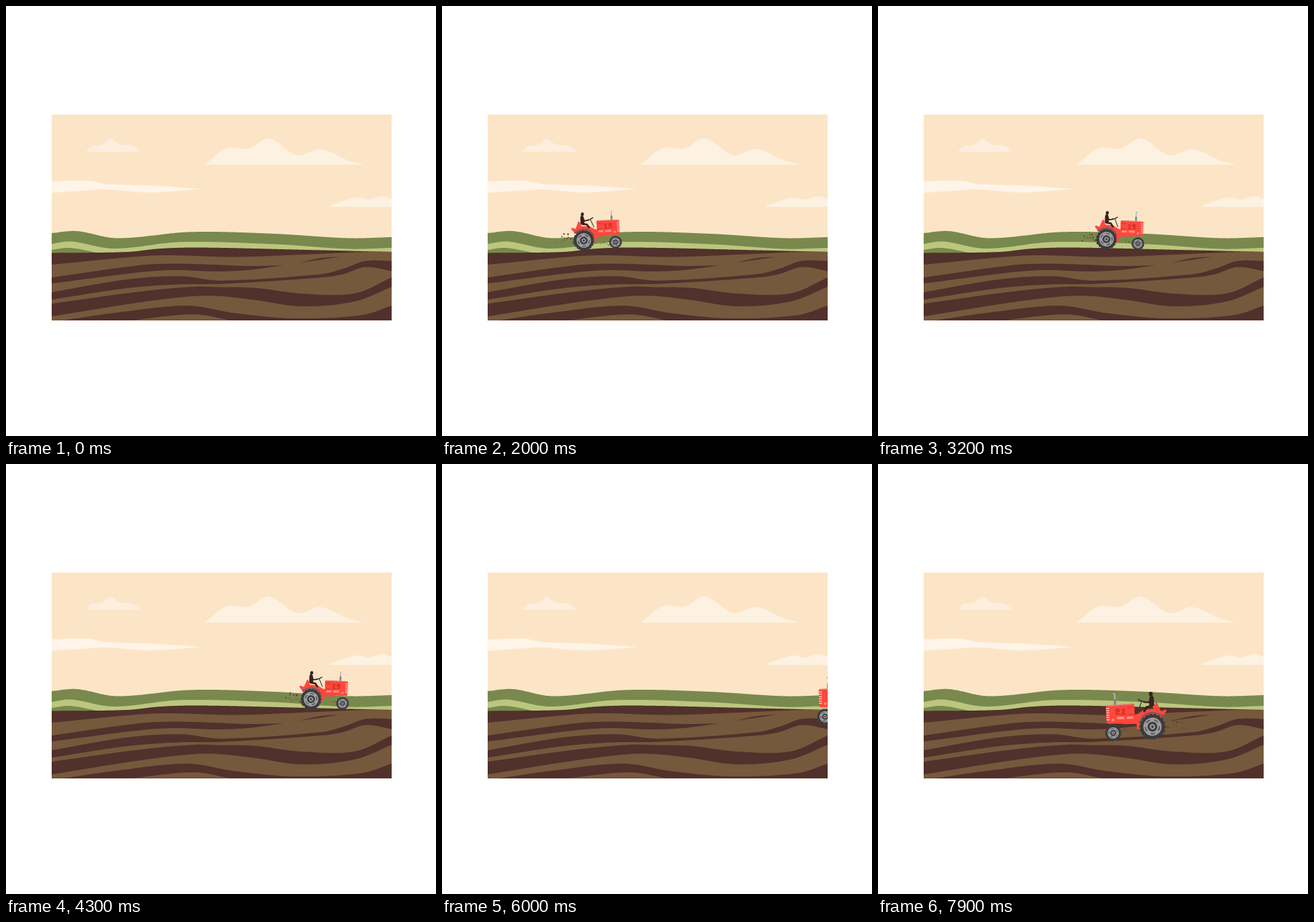
Recreate the animation shown at these times as an HTML page with a canvas. Size 640 by 640 pixels, loop 8 s.

```html
<!DOCTYPE html>
<html lang="en">
<head>
<meta charset="utf-8">
<title>Tractor in the field</title>
<style>
html, body { margin: 0; width: 100%; height: 100%; overflow: hidden; background: #fff; }
canvas { display: block; width: 640px; height: 640px; }
</style>
</head>
<body>
<canvas id="stage"></canvas>
<script>
const canvas = document.getElementById('stage');
const ctx = canvas.getContext('2d');
const ratio = window.devicePixelRatio || 1;
canvas.width = canvas.height = 640 * ratio;

const LOOP = 8000, STEP = 100, FLOOR = 468;
const SKY = '#fce5c6', CLOUD = '#fdf1e2', HAZE = '#fef4e8', GREEN = '#79894d', LIME = '#bbc67e';
const SOIL = '#76583d', FURROW = '#50312b';
const RED = '#ff473b', DEEP = '#d8322b', PINK = '#ff8d84';
const TYRE = '#3c3b3d', GUARD = '#626064', STEEL = '#9c9b9d', DARK = '#39231d';

// Smooth function of x through "x,y,..." keys; col picks the value
const parse = s => s.split(' ').map(p => p.split(',').map(Number));
function curve(keys, col = 1) {
  const p = parse(keys), last = p.length - 1;
  const slope = i => {
    const a = p[Math.max(i - 1, 0)], b = p[Math.min(i + 1, last)];
    return (b[col] - a[col]) / (b[0] - a[0]);
  };
  return x => {
    let i = 0;
    while (i < last - 1 && p[i + 1][0] < x) i++;
    const h = p[i + 1][0] - p[i][0], u = (x - p[i][0]) / h, v = 1 - u;
    return v * v * (1 + 2 * u) * p[i][col] + u * u * (1 + 2 * v) * p[i + 1][col]
      + h * u * v * (v * slope(i) - u * slope(i + 1));
  };
}
function outline(keys, top, bottom) {
  const p = parse(keys), x0 = p[0][0], x1 = p[p.length - 1][0];
  const path = new Path2D();
  const n = Math.ceil((x1 - x0) / 2), xAt = i => x0 + (x1 - x0) * i / n;
  for (let i = 0; i <= n; i++) path.lineTo(xAt(i), top(xAt(i)));
  for (let i = n; i >= 0; i--) path.lineTo(xAt(i), bottom(xAt(i)));
  return path;
}
// Area from a ridge down to a level base
const ridge = (color, keys, base = FLOOR) => [color, outline(keys, curve(keys), () => base)];
// Streak along "x,middle,thickness" keys
function streak(color, keys) {
  const mid = curve(keys), wide = curve(keys, 2);
  return [color, outline(keys, x => mid(x) - wide(x) / 2, x => mid(x) + wide(x) / 2)];
}

const scenery = [
  ridge(CLOUD, '296,236 328,212 362,212 391,197 433,222 468,213 510,230 533,236', 236),
  ridge('#fdeedf', '119,217 127,209 142,207 156,198 169,206 188,208 201,217', 217),
  ridge(CLOUD, '483,297 522,285 540,288 560,283 574,287', 299),
  streak(HAZE, '68,269.5,17 122,267.3,14.5 150,269,8 212,272.3,10.5 288,272.3,.5'),
  ridge(GREEN, '68,338 105,335 165,345.5 275,336.3 400,339 510,345.5 574,344'),
  ridge(LIME, '68,354 97,350.5 160,361 260,351.3 400,354.5 510,361.5 574,360'),
  ridge(GREEN, '68,363 95,360 137,367.5'),
  ridge(FURROW, '68,367.5 180,366 230,361 290,359.5 450,363 574,366'),
  ridge(SOIL, '68,385 190,373.3 240,371 340,373.5 440,370 540,365.8 574,365.8'),
  streak(FURROW, '68,408.5,9 200,391,10.5 250,388.3,9.5 310,390,10 360,390,6 413,386,0'),
  streak(FURROW, '437,382,0 468,376.5,2.4 498,373,0'),
  streak(FURROW, '68,431.5,11 180,413.5,13 260,408.2,12 320,411.2,5 470,401.5,5 502,395,8 535,384,9 574,387,15'),
  streak(FURROW, '68,452.5,19 200,433,16 280,424.8,14 320,425.2,13.5 370,428.5,18 440,437.5,19 520,433.5,12 574,411,14'),
  ridge(FURROW, '84,468 160,457 270,446 340,457 430,465 530,460 574,446'),
  ridge(SOIL, '185,468 280,459 335,468')
];

// speed: ms to rear wheel x; track: x to ground y
const trips = [
  { from: 100, to: 5600, dir: 1, size: 1,
    speed: curve('0,0 2000,211 3200,340 4300,454 5600,588'),
    track: curve('-20,368 150,367.5 211,364 258,361 340,362 454,365 660,368') },
  { from: 6000, to: 8000, dir: -1, size: 1.25,
    speed: curve('6000,629 7100,499.5 7900,408.5'),
    track: curve('330,412.8 408,409.8 500,396.8 571,388 640,388') }
];

const rand = n => { const v = Math.sin(n * 91.7) * 4375.5; return v - Math.floor(v); };

function shape(color, d) { ctx.fillStyle = color; ctx.fill(new Path2D(d)); }
function line(color, width, d) {
  ctx.strokeStyle = color; ctx.lineWidth = width;
  ctx.stroke(new Path2D(d));
}
function disc(color, x, y, r) {
  ctx.fillStyle = color;
  ctx.beginPath(); ctx.arc(x, y, r, 0, 7); ctx.fill();
}

function wheel(x, y, r, lugs, roll) {
  ctx.save();
  ctx.translate(x, y);
  ctx.rotate(roll / r);
  disc(TYRE, 0, 0, r * .96);
  ctx.lineCap = 'butt';
  for (let i = 0; i < lugs; i++) {
    ctx.rotate(2 * Math.PI / lugs);
    line(TYRE, r * .2, `M${r * .85} 0H${r * 1.01}`);
  }
  disc(STEEL, 0, 0, r * .71);
  for (let i = 0; i < 5; i++) {
    ctx.rotate(2 * Math.PI / 5);
    ctx.strokeStyle = TYRE; ctx.lineWidth = r * .07;
    ctx.beginPath(); ctx.arc(0, 0, r * .55, 0, .65); ctx.stroke();
  }
  disc(TYRE, 0, 0, r * .38);
  disc(STEEL, 0, 0, r * .21);
  disc(TYRE, 0, 0, r * .1);
  ctx.restore();
}

function spray(t, count, x, y, reach, lift, size, seed) {
  for (let i = 0; i < count; i++) {
    const a = rand(i + seed), b = rand(i + seed + 40);
    const p = (t / 700 + i / count) % 1;
    const px = x - reach * p * (.55 + .45 * a);
    const py = y - lift * (.5 + .9 * b) * 3.2 * p * (1 - p) - 4 * p;
    disc(i % 3 ? '#6a4e31' : '#573d27', px, py, size * (.6 + .6 * b) * (1 - .3 * p));
  }
}

// Origin at the rear axle, nose to the right
function tractor(roll) {
  ctx.lineCap = ctx.lineJoin = 'round';
  // exhaust
  line('#b9b6b8', 1.6, 'M43.3 -34V-39.5Q43.3 -41 44.6 -41.3');
  line('#858386', 2.7, 'M43.3 -28V-33.5');
  // steering
  line(TYRE, 1.1, 'M11.5 -31L16.5 -19');
  line(TYRE, 1.5, 'M7.5 -30Q11.5 -30 15.5 -33');
  // seat, fender and chassis
  shape(RED, 'M-17.5 -18Q-17.5 -20.5 -15 -19.5L-11 -18L-6.5 -28.5Q-5 -29.5 -4 -27L-2 -21.5L10 -20.5L17 -16L20.5 -15V-27Q21 -28.5 23 -28.5L53 -27.4Q54.6 -27.4 54.6 -25.5L54 -8Q54 -5.8 51 -5.8H36L33 -4.5H21.5L18.5 -3.5V2.5H16L-13 -12Z');
  // hood
  line('#d98d88', 1.1, 'M23 -28.1L52 -27.2');
  shape(DEEP, 'M22 -24.5H29V-23.5H22ZM31.5 -23H36V-21.5H35V-17H37V-15.5H31V-17H32.5V-21.5H31.5ZM38 -23.5H43V-16H38V-17.5H41V-19H38ZM21 -16H29V-15H21Z');
  shape(PINK, 'M22.5 -13.5H30V-10.5H22.5ZM33 -13.5H41.5V-10.5H33Z');
  disc(PINK, 46.7, -10, 1.7);
  for (let y = -24; y < -10; y += 2.7) line('#ffd3ce', 1, `M51 ${y}H54`);
  // wheels under the fender
  line(GUARD, 2.2, 'M-12.5 -12A17.2 17.2 0 0 1 16 -6');
  wheel(0, 0, 15.3, 18, roll);
  line(RED, 2.8, 'M-15.5 -17.5L-10.5 -15.5Q0 -22 10 -16Q17 -11 17.2 1');
  line(GUARD, 1.5, 'M-10 -13.5Q0 -19.5 9 -14Q14 -10 15 -5');
  wheel(47, 5.5, 9.5, 14, roll);
  // driver
  line(DARK, 2.8, 'M0 -24.5L6 -23.5L9 -19');
  shape(DARK, 'M-3 -34Q-2.5 -37.5 0 -37Q2.5 -36 2.5 -32L3 -24Q-1 -22 -3.2 -25Z');
  line(DARK, 1.8, 'M.5 -34L3 -29L9 -29.8');
  ctx.beginPath(); ctx.ellipse(.3, -39, 2.3, 2.7, .1, 0, 7); ctx.fill();
}

function draw(t) {
  ctx.setTransform(ratio, 0, 0, ratio, 0, 0);
  ctx.fillStyle = '#fff';
  ctx.fillRect(0, 0, 640, 640);
  ctx.save();
  ctx.beginPath(); ctx.rect(68, 161.5, 506, 306.3); ctx.clip();
  ctx.fillStyle = SKY;
  ctx.fillRect(68, 161, 506, 308);
  for (const [color, path] of scenery) { ctx.fillStyle = color; ctx.fill(path); }

  const trip = trips.find(r => t >= r.from && t < r.to);
  if (trip) {
    const { dir, size, speed, track } = trip;
    const x = speed(t), y = track(x), base = 47 * size;
    const tilt = Math.atan((track(x + dir * base) - y) / base);
    ctx.translate(x, y - 15 * size);
    ctx.scale(dir * size, size);
    spray(t, 15, -13, 8, 30, 15, 1.3, 3);
    spray(t, 8, 39, 9, 14, 5, .8, 17);
    ctx.rotate(tilt);
    tractor(dir * x / size);
  }
  ctx.restore();
}

function tick() {
  draw(Math.floor(performance.now() % LOOP / STEP) * STEP);
  requestAnimationFrame(tick);
}
tick();
</script>
</body>
</html>
```
